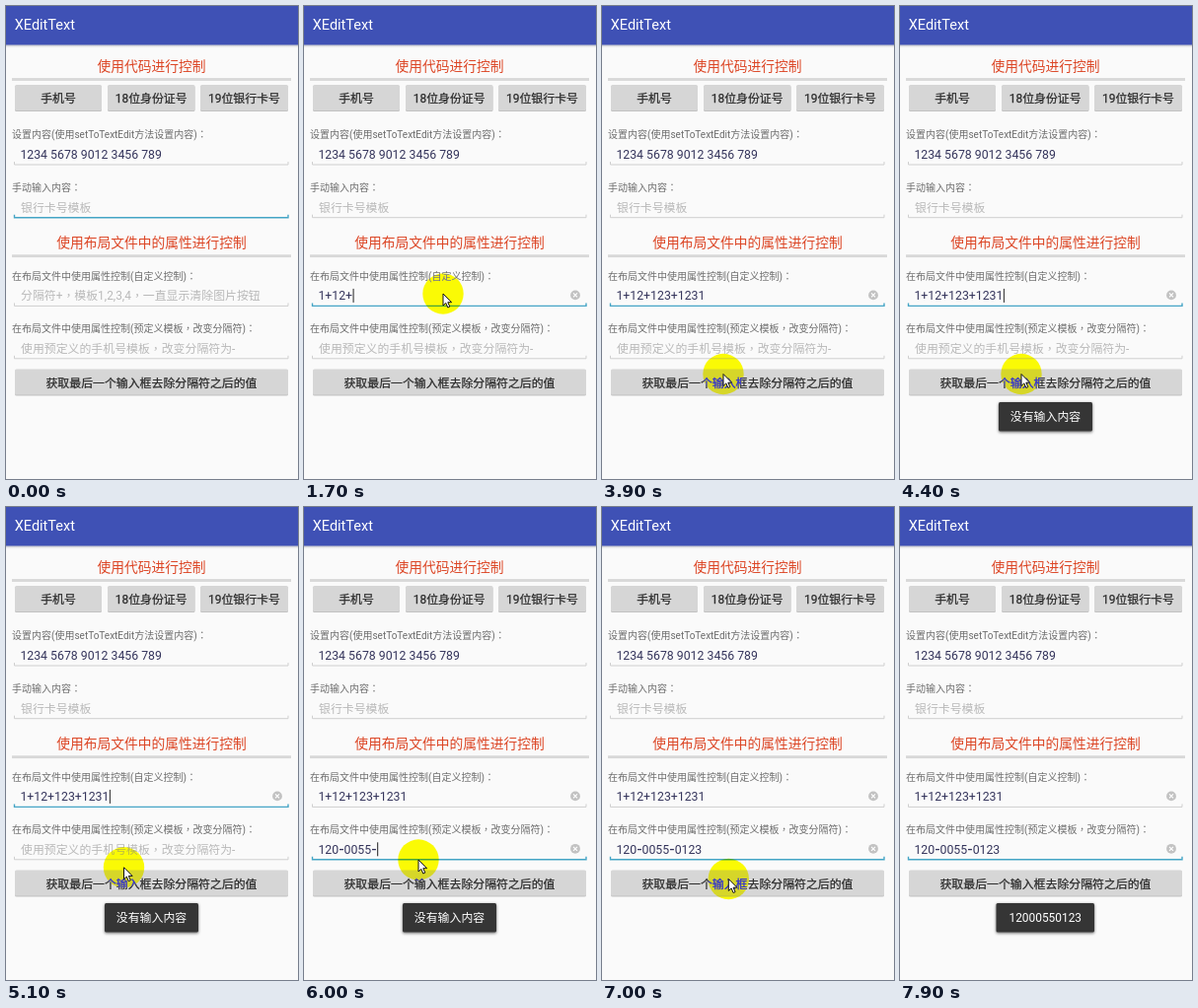
An HTML page for the animation above (8000 ms loop, 296 px wide and 480 px high).

```html
<!DOCTYPE html>
<html lang="zh-CN">
<head>
<meta charset="utf-8">
<title>XEditText</title>
<style>
  html, body { margin: 0; width: 100%; height: 100%; overflow: hidden; background: #fafafa; }
  svg { display: block; width: 100%; height: 100%; }
  text { font: 11.9px Roboto, "Noto Sans CJK SC", sans-serif; white-space: pre; }
  .bar { font-size: 14.5px; fill: #fff; }
  .heading { font-size: 13.75px; font-weight: 500; fill: #dc4423; text-anchor: middle; }
  .label { font-size: 10px; fill: #6c6c6c; }
  .mark { font-family: "Noto Sans CJK TC", sans-serif; }
  .hint { fill: #b9b9b9; }
  .value { font-size: 12.3px; fill: #35355c; }
  .dash { font-family: "DejaVu Sans", sans-serif; font-size: 15px; }
  .button { fill: #2b2b2b; stroke: #2b2b2b; stroke-width: .25; text-anchor: middle; }
  .toast { fill: #fff; text-anchor: middle; }
  .line { fill: none; stroke: #cfcfcf; stroke-width: 1; }
  .line.focus { stroke: #45a5c6; stroke-width: 1.4; }
  .halo { fill: #00f; mix-blend-mode: difference; }
</style>
</head>
<body>
<svg id="stage" viewBox="0 0 296 480">
  <defs>
    <linearGradient id="shade" x2="0" y2="1">
      <stop stop-color="#8c8f9c" stop-opacity=".6"/>
      <stop offset="1" stop-color="#fafafa" stop-opacity="0"/>
    </linearGradient>
    <filter id="soft" x="-20%" y="-40%" width="140%" height="200%">
      <feDropShadow dx="0" dy="1" stdDeviation="1.8" flood-opacity=".6"/>
    </filter>
  </defs>
  <rect width="296" height="480" fill="#fafafa"/>
  <rect width="296" height="39.6" fill="#3f51b5"/>
  <rect y="39.6" width="296" height="3.4" fill="url(#shade)"/>
  <text class="bar" x="8.7" y="24">XEditText</text>
</svg>
<script>
const LOOP = 8000, STEP = 100;
const stage = document.getElementById('stage');

function add(tag, attrs, content = '', parent = stage) {
  const el = document.createElementNS('http://www.w3.org/2000/svg', tag);
  for (const key in attrs) el.setAttribute(key, attrs[key]);
  el.textContent = content;
  return parent.appendChild(el);
}

// Full-width punctuation sits centred in its cell, as in Traditional Chinese.
function fill(text, content, dashes = false) {
  text.textContent = '';
  for (const part of content.split(dashes ? /(-)/ : /([，：])/)) {
    if (!part) continue;
    const style = part === '-' && dashes ? { class: 'dash' }
      : /[，：]/.test(part) ? { class: 'mark', lang: 'zh-TW' } : {};
    add('tspan', style, part, text);
  }
  return text;
}

const write = (cls, x, y, content, parent) =>
  fill(add('text', { class: cls, x, y }, '', parent), content);
const show = (el, on) => el.setAttribute('visibility', on ? 'visible' : 'hidden');

function heading(y, content) {
  write('heading', 147.5, y, content);
  add('rect', { x: 6, y: y + 7.3, width: 283, height: 2.8, fill: '#d8d8d8' });
}

const label = (y, content) => write('label', 6, y, content + '：');

function button(x, y, width, content) {
  add('rect', { x, y: y + 1, width, height: 26, rx: 1.5, fill: '#c2c2c2' });
  add('rect', { x, y, width, height: 26, rx: 1.5, fill: '#d6d6d6' });
  write('button', x + width / 2, y + 18.2, content);
}

function field(y, hintText = '') {
  const line = add('path', { class: 'line', d: `M8.5 ${y - 3}v3H286v-3` });
  const hint = write('hint', 15, y - 6, hintText);
  const value = write('value', 14.4, y - 6.2, '');
  const caret = add('rect', { y: y - 17.5, width: 1.2, height: 14, fill: '#444' });
  const clear = add('g', { transform: `translate(275 ${y - 11})` });
  add('circle', { r: 4.9, fill: '#c2c2c2' }, '', clear);
  add('path', { d: 'M-2-2 2 2M2-2-2 2', stroke: '#fff', 'stroke-width': 1.2 }, '', clear);
  let shown = null;

  return function update(content, focused, caretOn, clearable = true) {
    if (content !== shown) fill(value, shown = content, true);
    line.setAttribute('class', focused ? 'line focus' : 'line');
    caret.setAttribute('x', 14.8 + (content ? value.getComputedTextLength() : 0));
    show(hint, !content);
    show(caret, focused && caretOn);
    show(clear, content && clearable);
  };
}

function toast(x, width, content) {
  const group = add('g', {});
  add('rect', { x, y: 402, width, height: 29.5, rx: 1.5, fill: '#363636',
    filter: 'url(#soft)' }, '', group);
  write('toast', x + width / 2, 421, content, group);
  return group;
}

heading(65.8, '使用代码进行控制');
button(9, 80, 88, '手机号');
button(103, 80, 88.5, '18位身份证号');
button(197, 80, 89, '19位银行卡号');
label(134, '设置内容(使用setToTextEdit方法设置内容)');
const preset = field(161);
label(187.5, '手动输入内容');
const manual = field(214.7, '银行卡号模板');
heading(245, '使用布局文件中的属性进行控制');
label(278, '在布局文件中使用属性控制(自定义控制)');
const custom = field(304.4, '分隔符+，模板1,2,3,4，一直显示清除图片按钮');
label(331, '在布局文件中使用属性控制(预定义模板，改变分隔符)');
const mobile = field(357.8, '使用预定义的手机号模板，改变分隔符为-');
button(9, 368.5, 277, '获取最后一个输入框去除分隔符之后的值');
const emptyToast = toast(100, 95, '没有输入内容');
const resultToast = toast(97.5, 99.5, '12000550123');

const halo = add('circle', { class: 'halo', r: 20.7 });
const pointer = add('path', { d: 'M0 0V12L2.8 9.4 4.8 14 6.8 13.1 4.8 8.7H8.6Z',
  fill: '#fff', stroke: '#111', 'stroke-width': 1, 'stroke-linejoin': 'round' });

// Each key press: [time, visible characters]
const customKeys = [[900, 2], [1200, 3], [1600, 5], [1800, 6], [2000, 7], [2200, 9],
  [2500, 10], [2700, 11], [2900, 12], [3000, 13]];
const mobileKeys = [[5400, 1], [5500, 2], [5600, 4], [5700, 5], [5800, 6], [5900, 7],
  [6000, 9], [6100, 10], [6200, 11], [6300, 12], [6400, 13]];
// Pointer path: [time, x, y]
const path = [[100, 141, 292], [2300, 141, 292], [3000, 139.7, 321], [3300, 139.7, 321],
  [3800, 123, 373.5], [4900, 123, 373.5], [5300, 116, 358], [6500, 116, 358],
  [6900, 128.3, 377.5], [7500, 128.3, 377.5]];

function typed(full, keys, t, focusTime) {
  const last = keys.filter(key => key[0] <= t).pop() || [focusTime, 0];
  return [full.slice(0, last[1]), t >= focusTime && (t - last[0]) % 1000 < 500];
}

function pointAt(t) {
  let i = 1;
  while (i < path.length - 1 && path[i][0] < t) i++;
  const [t0, x0, y0] = path[i - 1], [t1, x1, y1] = path[i];
  const p = Math.min(1, Math.max(0, (t - t0) / (t1 - t0)));
  const k = p * p * (3 - 2 * p);
  return [x0 + (x1 - x0) * k, y0 + (y1 - y0) * k];
}

const fade = (t, start, end) =>
  Math.max(0, Math.min(1, (t - start) / 200, (end - t) / 300));

function render(t) {
  const [customText, customCaret] = typed('1+12+123+1231', customKeys, t, 400);
  const [mobileText, mobileCaret] = typed('120-0055-0123', mobileKeys, t, 5300);
  preset('1234 5678 9012 3456 789', false, false, false);
  manual('', t < 400, false);
  custom(customText, t >= 400 && t < 5300, customCaret);
  mobile(mobileText, t >= 5300, mobileCaret);
  emptyToast.setAttribute('opacity', fade(t, 3900, 6400));
  resultToast.setAttribute('opacity', fade(t, 7200, 9000));

  const [x, y] = pointAt(t);
  for (const el of [halo, pointer]) {
    el.setAttribute('transform', `translate(${x} ${y})`);
    show(el, t >= 100 && t < 7600);
  }
}

const start = performance.now();
function tick() {
  const t = (performance.now() - start) % LOOP;
  render(Math.floor(t / STEP) * STEP);
  requestAnimationFrame(tick);
}
tick();
</script>
</body>
</html>
```
